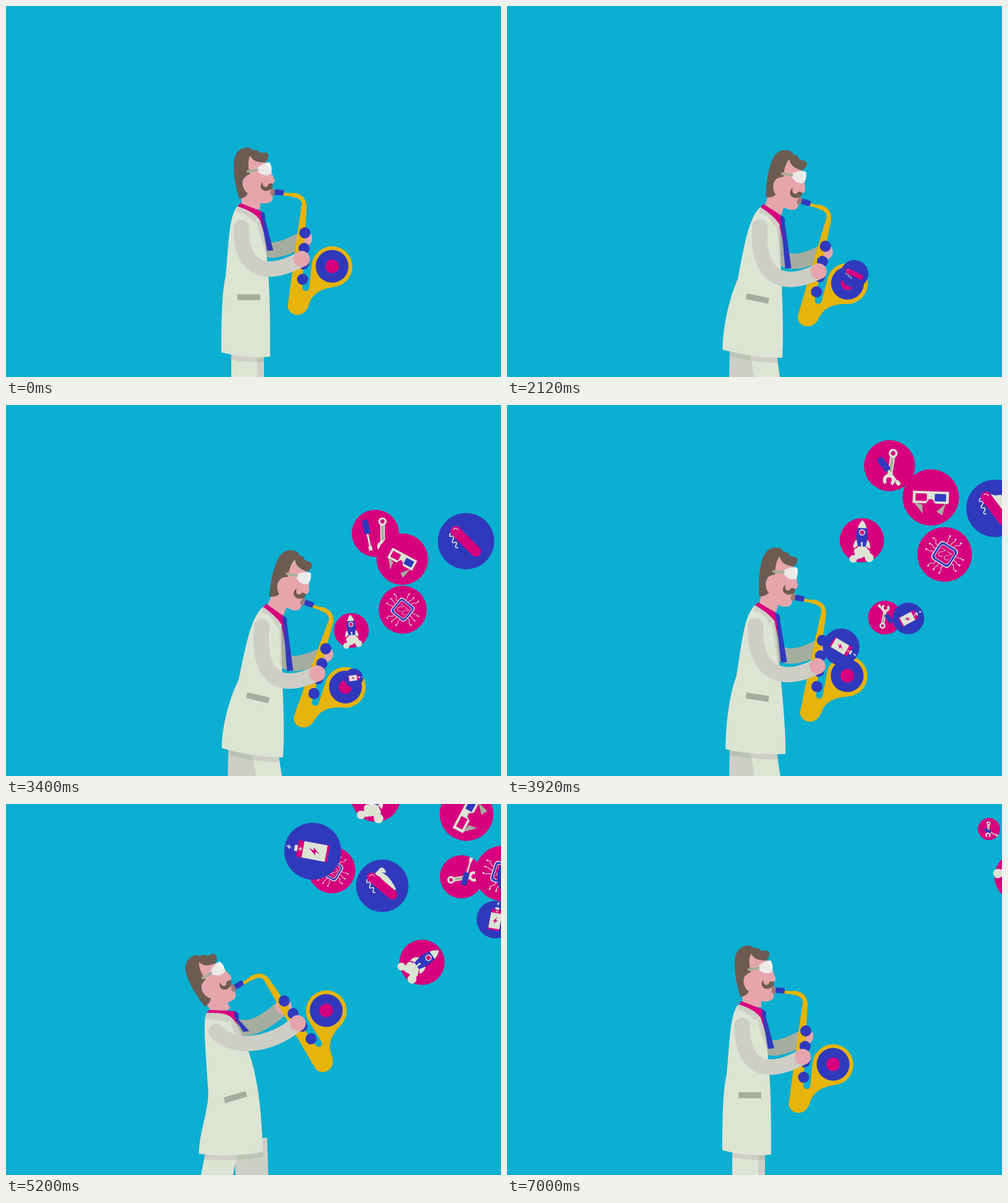
These frames come from a looping animation (800 px wide and 600 px high, 7040 ms). An HTML page with a canvas:

```html
<!DOCTYPE html>
<html lang="en">
<head>
<meta charset="utf-8">
<title>Saxophone player</title>
<style>
html, body { margin: 0; width: 100%; height: 100%; overflow: hidden; background: #0aafd1; }
canvas { display: block; width: 100vw; height: 100vh; }
</style>
</head>
<body>
<canvas id="stage" width="800" height="600"></canvas>
<script>
const ctx = document.getElementById("stage").getContext("2d");
const LOOP = 7040;
const SKY = "#0aafd1", COAT = "#dce4d4", GRAY = "#cecec7", SHADE = "#a5ad9e", SKIN = "#e6a5ad";
const HAIR = "#6c5b53", PINK = "#d6007e", BLUE = "#3039bc", GOLD = "#e6b40a";
const RAD = Math.PI / 180;

// Time, head shift, sax turn, near foot shift, coat swing
const moves = [
  [0, 0, 0, 0, 0],
  [920, -76, -32, -28, 0],
  [1200, -73, -30.6, -26, 0],
  [2120, 54, 8.4, 35, 0],
  [2880, 63, 12, 40, 0],
  [3640, 63, 12, 40, 0],
  [4400, -29, -20.5, 16, 24],
  [5060, -76, -38, -49, -11],
  [5380, -76, -38, -49, -11],
  [6840, 0, 0, 0, 0],
  [LOOP, 0, 0, 0, 0]
];

// Smooth monotone interpolation of rows [time, ...values]
function sample(rows, t) {
  let i = 0;
  while (i < rows.length - 2 && t > rows[i + 1][0]) i++;
  const [a, b] = [rows[i], rows[i + 1]], span = b[0] - a[0], u = (t - a[0]) / span;
  const slope = (j, k) => rows[j] && rows[j + 1]
    ? (rows[j + 1][k] - rows[j][k]) / (rows[j + 1][0] - rows[j][0]) : 0;
  const tangent = (j, k) => {
    const p = slope(j - 1, k), q = slope(j, k);
    return p * q > 0 ? 2 * p * q / (p + q) : 0;
  };
  return a.slice(1).map((v, n) => mix(v, b[n + 1], u * u * (3 - 2 * u)) +
    span * u * (1 - u) * ((1 - u) * tangent(i, n + 1) - u * tangent(i + 1, n + 1)));
}

const mix = (a, b, u) => a + (b - a) * u;
const add = ([x, y], dx, dy) => [x + dx, y + dy];

// A point given in the local axes of a frame [x, y, turn]
function local([x, y, turn], dx, dy) {
  const c = Math.cos(turn * RAD), s = Math.sin(turn * RAD);
  return [x + dx * c - dy * s, y + dx * s + dy * c];
}

// The head leads, the sax hangs from the mouth, and the body follows the lean.
function rig(t) {
  const [lean, lift, step, swing] = sample(moves, t);
  const bend = (a, b) => a * lean + b * lean * lean;
  const head = [418 + lean, 264 + bend(.108, .0021), bend(.31, .0004)];
  const sax = [...local([...local(head, 16, 37), lift], 49, 66), lift];
  const hemX = 387.5 + .17 * lean + swing, half = 39.5 + .25 * Math.abs(step);
  return {
    lean, lift, step, swing, head, sax,
    bell: local(sax, 44, 54),
    collar: [374 + .66 * lean, 324 + bend(-.063, .0016)],
    chest: [410 + .56 * lean, 346 + bend(.06, .0013)],
    waist: [355 + .33 * lean + .3 * swing, 437 + bend(-.09, .0034)],
    hemBack: [hemX - half, 560 - .08 * lean],
    hemFront: [hemX + half, 567 + .25 * lift - .5 * swing],
    shoulder: [380 + .53 * lean, 358 + bend(-.06, .0009)],
    hand: local(sax, -5, 42),
    farHand: add(sax, -1, 9),
    pocket: [392.5 + .23 * lean + .4 * swing, 471 + .04 * Math.abs(lean), .22 * lean]
  };
}

function fill(shape, color) {
  ctx.fillStyle = color;
  ctx.fill(typeof shape === "string" ? new Path2D(shape) : shape);
}
function stroke(d, color, width, cap = "round") {
  ctx.strokeStyle = color;
  ctx.lineWidth = width;
  ctx.lineCap = cap;
  ctx.lineJoin = "round";
  ctx.stroke(new Path2D(d));
}
function disc(x, y, r, color) {
  ctx.beginPath();
  ctx.arc(x, y, r, 0, 7);
  ctx.fillStyle = color;
  ctx.fill();
}
function box(x, y, w, h, color, r = 0) {
  ctx.beginPath();
  ctx.roundRect(x, y, w, h, r);
  ctx.fillStyle = color;
  ctx.fill();
}
function placed([x, y, turn], draw, scale = 1) {
  ctx.save();
  ctx.translate(x, y);
  ctx.rotate(turn * RAD);
  ctx.scale(scale, scale);
  draw();
  ctx.restore();
}
function clipped(shape, draw) {
  ctx.save();
  ctx.clip(shape);
  draw();
  ctx.restore();
}

function drawSax() {
  ctx.translate(-483, -367);
  stroke("M447 304L464 305.5", GOLD, 5);
  stroke("M464 305.5C477 307 482 314 482 323", GOLD, 7);
  fill("M478 320L470 375L456 480C453 492 462 499.5 471 499.5C481 499 486 493 489 485" +
    "C494 466 508 457 533 454A33 33 0 1 0 494 418L490 456A5.5 5.5 0 0 1 479 455L482 390L486 321Z", GOLD);
  placed([441.5, 301.5, 6], () => box(-7.5, -4.5, 15, 9, BLUE, 2));
  for (let i = 0; i < 4; i++) disc(483 - i * 1.2, 367 + i * 25, 9, BLUE);
  disc(527, 421, 26.5, BLUE);
  disc(527, 421, 11, PINK);
}

function drawHead() {
  ctx.translate(-418, -264);
  fill("M384 270L395 240Q402 252 417 253L426 254Q428 268 434 281Q435 288 428 288L431 296" +
    "V311Q431 317 422 319Q410 322 388 310L382 290Z", SKIN);
  fill("M377 312C371 292 368 275 368 258C368 236 379 228 393 229Q397 230 398 233Q406 231 410 237H419" +
    "Q425 238 424 244Q423 252 417 253Q404 253 399 248L394 242Q391 249 392 262L394 272" +
    "Q382 276 382 287Q384 299 391 303Q387 311 377 312Z", HAIR);
  fill("M405 265Q410 255 426 253Q430 260 429 270Q428 273 420 274Q410 273 405 265Z", "#ece9e9");
  fill("M420 254L426 253Q430 260 429 268Z", "#f8f8f8");
  stroke("M389 268L408 265", SHADE, 4, "butt");
  fill("M428 295Q434 294 434 299V306Q430 309 427 304Z", "#9d7b76");
  fill("M414 284C409 291 412 299 421 299C428 298 433 293 431 288C427 285 423 288 423 291C418 295 414 291 414 284Z", HAIR);
}

function drawArm(from, to, lift, drop, reach, color, cap) {
  const elbow = add(from, -.6 * lift, drop + lift);
  const wrist = add(to, -reach - .35 * lift, reach * .54 - .2 * lift);
  stroke(`M${from}C${elbow} ${wrist} ${to}`, color, 25, cap);
}

function coatPath({ lean, swing, collar, chest, waist, hemBack, hemFront }) {
  const hemLow = add(hemBack, (hemFront[0] - hemBack[0]) / 2, (hemFront[1] - hemBack[1]) / 2 + 7);
  return new Path2D(`M${collar}
    C${add(collar, -14 - .1 * lean, 16)} ${add(waist, 5 + .1 * lean, -52)} ${waist}
    C${add(waist, -7 - .12 * lean, 29)} ${add(hemBack, 0, -35)} ${hemBack}
    Q${hemLow} ${hemFront}
    C${add(hemFront, .08 * lean - .3 * swing, -60)} ${add(chest, 18 - .33 * lean, 55 - .15 * lean)} ${chest}
    Q${add(chest, -8, -13)} ${collar}Z`);
}

function drawLeg(x, shift, width, coat, color, shade) {
  const top = x + .75 * shift, end = x + shift;
  const leg = new Path2D(`M${top} 540H${top + width}L${end + width} 600H${end}Z`);
  fill(leg, color);
  clipped(leg, () => {
    ctx.translate(0, 8);
    fill(coat, shade);
  });
}

function drawMan(man) {
  const { lean, lift, step, head, sax, collar, chest, shoulder, hand, farHand } = man;
  const [nx, ny] = chest, coat = coatPath(man);

  drawLeg(364, -.14 * step, 53, coat, GRAY, "#bcc4b4");
  drawLeg(364, step, 42 + Math.max(0, -.2 * step), coat, COAT, GRAY);

  drawArm(add(chest, -4, 8), farHand, lift, 48, 54, SHADE, "butt");
  disc(...farHand, 13, SKIN);
  placed(sax, drawSax);

  const neck = [(collar[0] + nx) / 2 + 4, (collar[1] + ny) / 2 - 6];
  const tie = add(chest, 17 - .05 * lean, 50 + .4 * lean);
  stroke(`M${local(head, -23, 36)}L${neck}`, SKIN, 30, "butt");
  placed(head, drawHead);
  fill(`M${collar}l5 -5L${add(chest, 3, -14)}L${mix(nx, tie[0], .5)} ${mix(ny, tie[1], .5)}L${chest}Z`, PINK);
  fill(`M${add(chest, 3, -2)}l6 2L${add(tie, 5, -1)}l-10 1Z`, BLUE);
  fill(`M${add(chest, 2, -14)}q7 1 7 9q0 6 -4 7q-4 -4 -3 -16Z`, BLUE);

  fill(coat, COAT);
  clipped(coat, () => {
    fill(`M${collar}l-2 9Q${add(collar, 14, 11)} ${add(chest, -8, 4)}l6 -6Q${add(chest, -8, -13)} ${collar}Z`, GRAY);
    fill(`M${add(chest, -5, 2)}l5 -2L${add(chest, 22 - .33 * lean, 55)}l-4 15Q${add(chest, 0, 30)} ${add(chest, -5, 2)}Z`, GRAY);
  });
  placed(man.pocket, () => box(-18.5, -4.75, 37, 9.5, SHADE));
  drawArm(shoulder, hand, lift, 66, 62, GRAY, "round");
  disc(...hand, 13, SKIN);
}

const BOLT = "M-4 10L0 2L-6 2L4 -10L1 -2L6 -2Z";

// Icons are drawn for a bubble of radius 46; open goes from 0 to 1.
const icons = {
  tools(open) {
    placed([mix(14, -3, open), 0, 0], () => {
      stroke("M0 -18V18", COAT, 9, "butt");
      stroke("M0 -15V14", SHADE, 5, "butt");
      stroke("M-6 -23a6 6 0 1 0 12 0a6 6 0 1 0 -12 0", COAT, 4);
      stroke("M-5 32A8 8 0 1 1 5 32", COAT, 6, "butt");
    });
    placed([mix(-15, 9, open), mix(3, 14, open), mix(-11, -65, open)], () => {
      stroke("M0 -4V24", COAT, 3.5);
      box(-3.5, 22, 7, 9, COAT, 1);
      box(-6, -30, 12, 28, BLUE, 4);
    });
  },
  glasses(open) {
    ctx.scale(mix(.78, 1, open), 1);
    fill("M-30 9L-13 27L-15 12ZM27 9L21 29L11 23Z", SHADE);
    fill("M-32 -10H32V10H8L3 3H-3L-8 10H-32Z", COAT);
    box(-27, -6, 20, 12, PINK, 1);
    box(7, -6, 20, 12, BLUE, 1);
  },
  chip() {
    for (let side = 0; side < 4; side++) {
      for (let i = -1; i < 2; i++) {
        stroke(`M${i * 7} -18v-4l${i * 4 + 2} -4v-5`, COAT, 1.1);
        disc(i * 11 + 2, -31, 1.5, COAT);
      }
      ctx.rotate(Math.PI / 2);
    }
    [[18, COAT], [16.5, BLUE], [13.5, COAT], [12.5, PINK]].forEach(([r, color]) =>
      box(-r, -r, 2 * r, 2 * r, color, r / 3));
    ctx.fillStyle = COAT;
    ctx.font = "300 20px Lato, sans-serif";
    ctx.textAlign = "center";
    ctx.textBaseline = "middle";
    ctx.fillText("22", 0, 1);
  },
  knife(open) {
    stroke("M-27 9q2 7 5 2t5 2t5 2t5 1t5 1", COAT, 1.8);
    placed([-20, 0, -84 * open], () => fill("M0 -4L22 -5Q28 0 22 8L18 3L0 4Z", COAT));
    placed([0, -11 * open, 8 * open], () => fill("M-22 0Q-8 -12 22 -3V4H-18Z", COAT));
    box(-32, -8, 64, 17, PINK, 8.5);
    stroke("M-28 1V-1Q-27 -4 -22 -4", COAT, 1.2);
  },
  rocket() {
    for (let i = 0; i < 8; i++) disc(Math.sin(i * 2.4) * (5 + i * 2), 17 + i * 3.2, 9 - i % 3, COAT);
    fill("M-9 -2Q-19 3 -17 18L-7 11ZM9 -2Q19 3 17 18L7 11Z", COAT);
    fill("M0 -42Q18 -20 8 13H-8Q-18 -20 0 -42Z", BLUE);
    fill("M0 -42Q8 -33 9 -25H-9Q-8 -33 0 -42Z", COAT);
    disc(0, -16, 6.5, COAT);
    disc(0, -16, 4.5, PINK);
    fill("M-2 4H2L1 20H-1Z", COAT);
  },
  battery() {
    box(-5, -30, 10, 6, COAT, 1);
    box(-13.5, -25, 27, 51, PINK, 1);
    box(-13.5, -16, 27, 38, COAT);
    stroke("M-3 -20.5H3M0 -23.5V-17.5", COAT, 1.3);
    placed([0, 3, 0], () => fill(BOLT, PINK));
    placed([0, -39, 0], () => fill(BOLT, "#c6d5ef"), .65);
  }
};

// Icon, birth, heading, radius, first turn, turn per second
const bubbles = [
  ["tools", 2540, -79, 42, -16, 18],
  ["tools", 3480, -61, 35, 165, 56],
  ["glasses", 2600, -66, 46.5, 68, -50],
  ["chip", 2820, -53.5, 46.5, 226, -12],
  ["knife", 2060, -49.5, 46.5, 25, 15],
  ["rocket", 3120, -84, 40, -8, 12],
  ["battery", 3330, -48, 30.5, 85, -40],
  ["knife", 4270, -76, 46, 5, 38],
  ["chip", 4130, -94, 40, -20, 47],
  ["battery", 3730, -98, 46.5, 150, -156],
  ["rocket", 4410, -42, 41, 25, 38]
];
const LIFE = 3.6;

// Each bubble leaves the bell in a straight line, slowing down, and swells then shrinks.
function drawBubble([icon, birth, heading, size, turn, spin], t) {
  const age = (t - birth) / 1000;
  if (age <= 0 || age >= LIFE) return;
  const a = Math.min(age, 3), rise = Math.sin(-heading * RAD);
  const distance = (345 * a - 57 * a * a) * rise ** .7;
  const [x, y] = local([...rig(birth).bell, heading], distance, 0);
  const r = size * Math.sin(Math.PI * age / LIFE) ** .25;
  const open = Math.min(1, Math.max(0, (t - 3400) / 800));
  disc(x, y, r, icon === "knife" || icon === "battery" ? BLUE : PINK);
  placed([x, y, turn + spin * age], () => icons[icon](open), r / 46);
}

const start = performance.now();
function frame() {
  const t = (performance.now() - start) % LOOP;
  ctx.fillStyle = SKY;
  ctx.fillRect(0, 0, 800, 600);
  drawMan(rig(t));
  for (const b of bubbles) drawBubble(b, t);
  requestAnimationFrame(frame);
}
frame();
</script>
</body>
</html>
```
